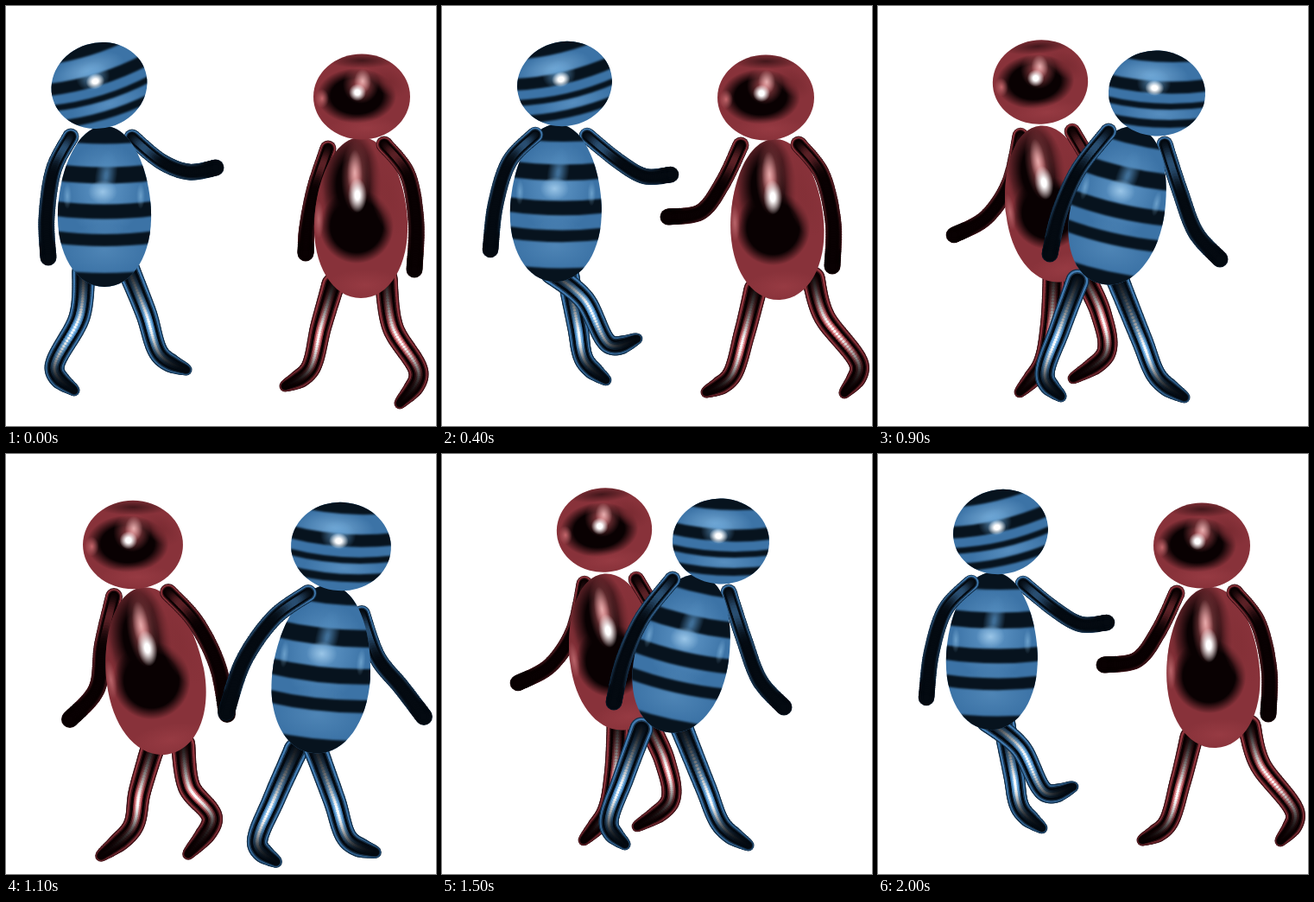
Animation, 498 px wide and 486 px high, one loop 2100 ms. Source, as an HTML page with a canvas:

```html
<!DOCTYPE html>
<html>
<head>
<meta charset="utf-8">
<style>
html, body { margin: 0; width: 498px; height: 486px; overflow: hidden; background: #fff; }
canvas { display: block; }
</style>
</head>
<body>
<canvas width="498" height="486"></canvas>
<script>
const ctx = document.querySelector('canvas').getContext('2d');
const STEP = 100, STEPS = 21, TURN = 12;
const KEYS = [0, 4, 6, 9, 11];

// Each track has one row per key. head: x, y, tilt. body: x, y, tilt, scale. Limbs: four joints.
const blue = {
  dim: [20, 48, 74], mid: [66, 124, 178], dark: [4, 10, 17], glow: [120, 180, 228],
  frontArm: 'left',
  head: [[108, 92, -17], [142, 90, -13], [239, 89, 2], [323, 101, 3], [388, 107, 4]],
  body: [[114, 232, 0, 1], [132, 228, 1, .98], [197, 221, 16, .98], [279, 231, 13, 1], [366, 249, 6, 1.05]],
  left: [
    [75, 151, 55, 190, 47, 245, 49, 291], [108, 149, 78, 180, 62, 230, 56, 282],
    [198, 134, 155, 160, 125, 205, 107, 251], [267, 145, 232, 190, 210, 240, 199, 287],
    [350, 161, 310, 190, 275, 240, 255, 299]],
  right: [
    [146, 152, 180, 180, 212, 192, 243, 187], [168, 150, 205, 180, 235, 197, 265, 195],
    [250, 160, 265, 200, 280, 222, 297, 228], [332, 160, 350, 215, 368, 262, 396, 293],
    [412, 185, 430, 235, 458, 270, 484, 304]],
  legA: [
    [90, 306, 85, 360, 56, 418, 79, 445], [126, 308, 165, 340, 193, 391, 226, 385],
    [175, 300, 178, 360, 163, 415, 197, 422], [278, 318, 305, 385, 324, 430, 355, 453],
    [358, 340, 380, 400, 396, 446, 428, 461]],
  legB: [
    [141, 303, 162, 355, 178, 403, 209, 421], [146, 312, 157, 370, 165, 410, 190, 433],
    [165, 300, 156, 345, 130, 410, 145, 431], [231, 318, 210, 375, 193, 427, 212, 452],
    [336, 342, 310, 400, 291, 450, 313, 472]]
};
const red = {
  dim: [62, 20, 25], mid: [146, 54, 62], dark: [9, 1, 2], glow: [222, 136, 140],
  frontArm: 'right',
  head: [[412, 105, 0], [375, 106, 0], [344, 99, 4], [188, 88, -5], [147, 105, 0]],
  body: [[411, 245, 0, 1], [388, 247, -2, 1], [359, 240, -1, 1], [200, 229, -9, .98], [172, 251, -9, 1.05]],
  left: [
    [373, 165, 358, 210, 349, 255, 347, 286], [346, 161, 325, 205, 300, 238, 262, 244],
    [320, 158, 308, 190, 303, 215, 294, 230], [165, 150, 152, 205, 125, 245, 88, 265],
    [125, 165, 112, 220, 105, 272, 74, 307]],
  right: [
    [438, 160, 465, 195, 475, 250, 473, 305], [413, 160, 440, 195, 453, 250, 452, 301],
    [385, 150, 410, 185, 424, 240, 424, 291], [225, 145, 250, 190, 262, 235, 260, 280],
    [188, 160, 220, 195, 245, 245, 256, 301]],
  legA: [
    [379, 322, 365, 370, 352, 420, 323, 440], [363, 328, 350, 380, 335, 428, 306, 447],
    [336, 320, 318, 370, 302, 417, 265, 440], [204, 308, 200, 370, 190, 415, 164, 447],
    [171, 336, 155, 390, 146, 433, 110, 465]],
  legB: [
    [440, 315, 448, 372, 478, 425, 456, 460], [430, 315, 443, 360, 483, 415, 466, 448],
    [402, 303, 417, 350, 456, 402, 438, 438], [236, 308, 258, 355, 264, 402, 226, 431],
    [205, 336, 212, 385, 239, 423, 211, 463]]
};

const mix = (a, b, k) => a.map((v, i) => v + (b[i] - v) * k);
const rgba = (c, a = 1) => `rgba(${c.map(Math.round)},${a})`;
const WHITE = [255, 255, 255];

function slope(rows, i, n) {
  const a = Math.max(i - 1, 0), b = Math.min(i + 1, KEYS.length - 1);
  return (rows[b][n] - rows[a][n]) / (KEYS[b] - KEYS[a]);
}

// Smooth interpolation between keys, straight on past the last one.
function pose(rows, s) {
  const last = KEYS.length - 1;
  if (s >= KEYS[last]) return rows[last].map((v, n) => v + slope(rows, last, n) * (s - KEYS[last]));
  const i = KEYS.findIndex((k, n) => s < KEYS[n + 1]);
  const d = KEYS[i + 1] - KEYS[i], u = (s - KEYS[i]) / d, e = u * u * (3 - 2 * u);
  return rows[i].map((v, n) => v + (rows[i + 1][n] - v) * e +
    d * u * (1 - u) * (slope(rows, i, n) * (1 - u) - slope(rows, i + 1, n) * u));
}

function spline(p, t) {
  const i = Math.min(2, Math.floor(t * 3)), u = t * 3 - i;
  return [0, 1].map(c => {
    const [a, b, d, e] = [-1, 0, 1, 2].map(k => p[2 * Math.min(3, Math.max(0, i + k)) + c]);
    return b + u * ((d - a) + u * ((2 * a - 5 * b + 4 * d - e) + u * (3 * (b - d) + e - a))) / 2;
  });
}

function limb(fig, p, isArm, scale) {
  const layers = isArm ? 5 : 7, n = 60;
  for (let k = 0; k < layers; k++) {
    for (let j = 0; j <= n; j++) {
      const t = j / n, [x, y] = spline(p, t);
      const shine = isArm ? .6 * Math.exp(-(((t - .17) / .1) ** 2)) : Math.exp(-(((t - .42) / .24) ** 2));
      const rim = isArm ? mix(fig.mid, fig.dark, Math.min(1, t * 1.05)) : mix(fig.mid, fig.dim, t * t * .6);
      const tone = [fig.dim, rim, mix(rim, fig.dark, .6), fig.dark,
        mix(fig.dark, fig.mid, shine), mix(fig.dark, fig.glow, shine), mix(fig.dark, WHITE, shine)][k];
      const r = isArm ? 9.5 : 13.5 - 3 * t - 20 * Math.max(0, t - .8);
      ctx.fillStyle = rgba(isArm && t > .85 ? mix(tone, fig.dark, .7) : tone);
      ctx.beginPath();
      ctx.arc(x, y, r * scale * [1, .9, .74, .62, .4, .27, .14][k], 0, 7);
      ctx.fill();
    }
  }
}

// Soft oval: solid out to the fraction `core`, then fading.
function blob(x, y, rx, ry, color, core = 0, alpha = 1, turn = 0) {
  ctx.save();
  ctx.translate(x, y);
  ctx.rotate(turn);
  ctx.scale(rx, ry);
  const g = ctx.createRadialGradient(0, 0, 0, 0, 0, 1);
  g.addColorStop(core, rgba(color, alpha));
  g.addColorStop(1, rgba(color, 0));
  ctx.fillStyle = g;
  ctx.fillRect(-1, -1, 2, 2);
  ctx.restore();
}

function stripes(list, half, sag, color) {
  ctx.save();
  ctx.filter = 'blur(1.3px)';
  ctx.strokeStyle = color;
  for (const [y, w] of list) {
    ctx.lineWidth = w;
    ctx.beginPath();
    ctx.moveTo(-half, y - sag);
    ctx.quadraticCurveTo(0, y + sag, half, y - sag);
    ctx.stroke();
  }
  ctx.restore();
}

// Runs `paint` inside an outline placed at x, y.
function part(x, y, tilt, scale, outline, base, paint) {
  ctx.save();
  ctx.translate(x, y);
  ctx.rotate(tilt * Math.PI / 180);
  ctx.scale(scale, scale);
  ctx.beginPath();
  outline();
  ctx.clip();
  ctx.fillStyle = rgba(base);
  ctx.fillRect(-70, -110, 140, 220);
  paint();
  ctx.restore();
}

const ball = () => ctx.ellipse(0, 0, 56, 49.5, 0, 0, 7);
function egg() {
  ctx.moveTo(0, -93);
  for (const [sx, sy] of [[1, 1], [-1, -1]]) {
    if (sy > 0) {
      ctx.bezierCurveTo(32, -93, 52, -42, 54, 5);
      ctx.bezierCurveTo(56, 55, 33, 93, 0, 93);
    } else {
      ctx.bezierCurveTo(-33, 93, -56, 55, -54, 5);
      ctx.bezierCurveTo(-52, -42, -32, -93, 0, -93);
    }
  }
}

blue.paintBody = () => {
  blob(0, 50, 50, 30, [91, 145, 192], 0, .6);
  blob(0, -20, 46, 55, [110, 165, 212], 0, .7);
  stripes([[-83, 21], [-36, 19], [6, 17], [39, 14], [86, 18]], 60, 4, '#07131e');
  blob(2, -36, 13, 30, [82, 140, 190], .1, .75, .15);
  blob(-2, -17, 17, 14, [170, 210, 240], 0, .8);
  blob(-43, -12, 5, 15, [150, 200, 235], 0, .5);
  blob(42, -12, 5, 15, [150, 200, 235], 0, .5);
};
blue.paintHead = () => {
  blob(-8, -20, 44, 20, [130, 182, 224], 0, .75);
  blob(5, 24, 45, 16, [105, 160, 208], 0, .6);
  stripes([[-45, 17], [-7, 14], [15, 7], [35, 9]], 62, 6, '#07131e');
  blob(-4, -12, 20, 17, [105, 165, 215], 0, .85);
  blob(-3, -6, 11, 9, WHITE, .3);
};
red.paintBody = () => {
  blob(-12, -38, 36, 64, red.dark, .45);
  blob(-5, 10, 43, 43, red.dark, .7);
  blob(30, -28, 20, 52, [132, 48, 55], .2, .85, -.25);
  blob(-49, -15, 9, 42, [125, 45, 52], .2, .8);
  blob(-49, 2, 6, 22, [222, 136, 140], 0, .6);
  blob(-6, -47, 17, 42, [190, 90, 96], 0, .95);
  blob(-7, -52, 9, 27, [238, 180, 180], 0, .9);
  blob(-4, -26, 11, 20, WHITE, .25);
  blob(5, 78, 44, 18, [160, 64, 72], 0, .6);
};
red.paintHead = () => {
  blob(0, -42, 40, 9, red.dark, 0, .55);
  blob(-6, -1, 46, 32, red.dark, .65);
  blob(32, -17, 23, 15, [120, 42, 49], .1, .8, .6);
  blob(-46, 2, 8, 11, [215, 115, 120], 0, .85);
  blob(-1, -14, 21, 22, [178, 78, 85], .05, .95);
  blob(1, -18, 10, 14, [240, 185, 185], 0, .9);
  blob(-5, -5, 10, 10, WHITE, .3);
  blob(5, 36, 42, 13, [160, 64, 72], 0, .6);
};

function figure(fig, s) {
  const [hx, hy, turn] = pose(fig.head, s);
  const [bx, by, lean, scale] = pose(fig.body, s);
  const draw = (name, isArm) => limb(fig, pose(fig[name], s), isArm, scale);
  const base = mix(fig.mid, fig.dim, .12);
  draw('legB', false);
  draw('legA', false);
  draw(fig.frontArm === 'left' ? 'right' : 'left', true);
  part(bx, by, lean, scale, egg, base, fig.paintBody);
  draw(fig.frontArm, true);
  part(hx, hy, turn, 1 + (scale - 1) * .7, ball, base, fig.paintHead);
}

let shown = -1;
function frame() {
  const step = Math.floor(performance.now() / STEP) % STEPS;
  if (step !== shown) {
    shown = step;
    const s = step > TURN ? 2 * TURN - step : step;
    ctx.fillStyle = '#fff';
    ctx.fillRect(0, 0, 498, 486);
    figure(red, s);
    figure(blue, s);
  }
  requestAnimationFrame(frame);
}
frame();
</script>
</body>
</html>
```
